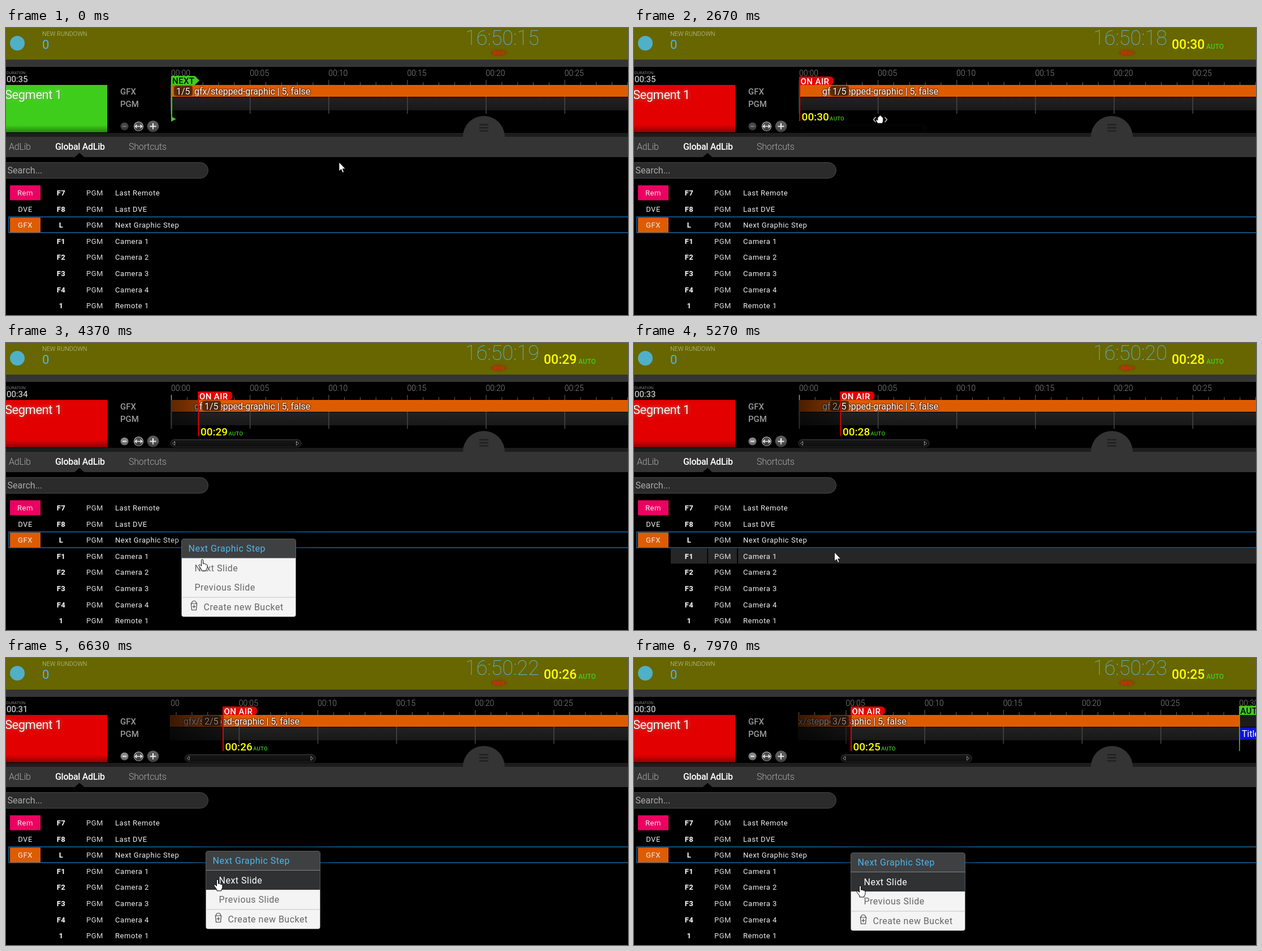
Animation, 1100 px wide and 509 px high, one loop 8000 ms. Source, as an HTML page:

```html
<!DOCTYPE html>
<html lang="en">
<head>
<meta charset="utf-8">
<title>Rundown view</title>
<style>
html, body { margin: 0; width: 100%; height: 100%; overflow: hidden; background: #000; }
svg { display: block; width: 1100px; height: 509px; font-family: Roboto, Arial, sans-serif; }
text { white-space: pre; }
.menu rect.back { filter: drop-shadow(0 0 26px rgba(0, 0, 0, .75)); }
.menu text { font-size: 16px; letter-spacing: .5px; }
.list text { font-size: 13px; letter-spacing: .55px; }
.tab { font-weight: 300; letter-spacing: -.2px; }
.flag { font-weight: 500; font-size: 15px; letter-spacing: .4px; }
.clip text { text-shadow: 0 0 3px #000, 0 0 3px rgba(0, 0, 0, .6); letter-spacing: -.05px; }
#segName { text-shadow: 0 0 6px rgba(255, 255, 255, .5), 1px 1px 3px rgba(0, 0, 0, .35); }
#mode { text-shadow: 0 0 5px rgba(255, 0, 0, .6); }
</style>
</head>
<body>
<svg id="stage" viewBox="0 0 1100 509"></svg>
<script>
const LOOP = 8000, SEC = 27.83, ZERO = 292.5, STICK = 384;
const TICK = 450;          // clock phase
const AIR = 2600, START = 2650;
const ORANGE = '#de5c00', GREEN = '#3fcd1c', RED = '#e20000', BLUE = '#4fb6ea';
const ROW_Y = i => 278 + i * 28.6;

const text = (x, y, size, fill, str, attr = '') =>
  `<text x="${x}" y="${y}" font-size="${size}" fill="${fill}" ${attr}>${str}</text>`;
const rect = (x, y, w, h, fill, attr = '') =>
  `<rect x="${x}" y="${y}" width="${w}" height="${h}" fill="${fill}" ${attr}/>`;
const path = (d, fill, attr = '') => `<path d="${d}" fill="${fill}" ${attr}/>`;
const group = (id, body, attr = '') => `<g id="${id}" ${attr}>${body}</g>`;

const rows = [
  ['Rem', 'F7', 'Last Remote', '#ec0062'], ['DVE', 'F8', 'Last DVE'],
  ['GFX', 'L', 'Next Graphic Step', ORANGE], ['', 'F1', 'Camera 1'],
  ['', 'F2', 'Camera 2'], ['', 'F3', 'Camera 3'], ['', 'F4', 'Camera 4'], ['', '1', 'Remote 1']
];

function header() {
  return rect(0, 0, 1100, 56, '#676600') + rect(0, 56, 1100, 13, '#343434') +
    `<circle cx="20" cy="27" r="13" fill="#4fb0c8"/>` +
    text(64, 13.5, 10.8, '#c3c8a8', 'NEW RUNDOWN', 'font-weight="300"') +
    text(64, 36.5, 22, BLUE, '0') +
    text(812, 29.5, 36, '#5db9dc', '', 'id="clock" font-weight="100"') +
    `<ellipse cx="872" cy="44" rx="15" ry="6" fill="#a01a00" opacity=".25"/>` +
    text(872, 47.5, 9, '#ff1a1a', 'REH', 'id="mode" text-anchor="middle" font-weight="500" letter-spacing="1"') +
    group('headCount', text(951, 36.5, 23, '#ff0', '', 'class="left" font-weight="500"') +
      text(1012, 36.5, 12, GREEN, 'AUTO', 'font-weight="500"'));
}

function segment() {
  return text(1, 81.5, 7, '#bbb', 'DURATION', 'font-weight="300"') +
    text(1, 95.5, 15, '#eee', '', 'id="duration"') +
    rect(0, 101, 179, 84, GREEN, 'id="segBack"') +
    text(-2, 126, 22, '#eef6ea', 'Segment 1', 'id="segName" letter-spacing="-.5"') +
    text(202, 118, 15, '#999', 'GFX', 'font-weight="500"') +
    text(202, 140, 15, '#999', 'PGM', 'font-weight="500"') +
    group('minus', '<circle cx="209.5" cy="174.5" r="7" fill="#888"/>' +
      path('M206 174.5h7', 'none', 'stroke="#fff" stroke-width="2"')) +
    '<circle cx="234.5" cy="174.5" r="8" fill="#4a4a4a" stroke="#ccc" stroke-width="1.2"/>' +
    path('M229 174.5h11M231.5 171.5l-3 3 3 3M237.5 171.5l3 3-3 3', 'none', 'stroke="#fff" stroke-width="1.5"') +
    '<circle cx="260" cy="174.5" r="10.3" fill="#5c5c5c"/>' +
    path('M254.5 174.5h11M260 169v11', 'none', 'stroke="#fff" stroke-width="2"');
}

function timeline() {
  let scale = '', lines = '';
  for (let s = 0; s <= 38; s++) {
    const x = ZERO + s * SEC, major = s % 5 === 0;
    scale += path(`M${x} ${major ? 92 : 96}V101`, 'none', 'stroke="#666"');
    if (!major) continue;
    scale += text(x - .5, 85, 14, '#8a8a8a', '00:' + String(s).padStart(2, '0'), 'font-weight="300"');
    lines += path(`M${x} 122V152`, 'none', 'stroke="#484848" stroke-width="1.5"');
  }
  const end = ZERO + 30 * SEC;
  const moving = scale +
    rect(ZERO, 101, 30 * SEC, 21, ORANGE) + lines +
    path(`M${ZERO} 92V152`, 'none', 'stroke="#999" stroke-width="1.5"') +
    `<g class="clip">${text(333, 118, 16, '#fff', 'gfx/stepped-graphic | 5, false')}</g>` +
    rect(end, 124, 140, 20, '#0b12e0') + text(end + 4, 140, 16, '#fff', 'Title') +
    path(`M${end} 85h42l8 8-8 8H${end}z`, GREEN) + path(`M${end} 85V165`, 'none', `stroke="${GREEN}" stroke-width="1.5"`) +
    text(end + 1.5, 99, 15, '#000', 'AUTO', 'class="flag"');
  return `<g clip-path="url(#lane)">` +
    rect(290, 101, 810, 21, '#1c1c1c') + rect(290, 123, 810, 23, 'url(#track)') +
    group('moving', moving) +
    group('step', rect(0, 102.5, 33, 18, '#5f2b08', 'rx="4"') +
      text(4, 117.5, 16, '#fff', '', 'id="stepText"'), 'class="clip"') +
    group('past', rect(-94, 101, 94, 51, 'url(#fade)')) + '</g>' +
    group('next', path('M292 85h42l8 8-8 8h-42z', GREEN) +
      path('M293 86V163', 'none', `stroke="${GREEN}" stroke-width="2"`) + path('M292 157l9 4.5-9 4.5z', GREEN) +
      text(294, 99, 15, '#000', 'NEXT', 'class="flag"')) +
    group('air', path('M-1 86h54q7 0 7 7.5t-7 7.5h-54z', RED) +
      path('M0 86V165', 'none', `stroke="${RED}" stroke-width="2"`) +
      text(1.5, 99.5, 15, '#fff', 'ON AIR', 'class="flag"') +
      text(3.5, 164, 19, '#ff0', '', 'class="left" font-weight="500"') +
      text(53, 164, 9.5, GREEN, 'AUTO', 'font-weight="500" letter-spacing=".3"')) +
    group('bar', rect(.5, 171.5, 231, 13, '#161616', 'rx="6.5" stroke="#444"') +
      path('M8 174.5v7l-4-3.5zM223 174.5v7l4-3.5z', '#000', 'stroke="#bbb"'));
}

function panel() {
  let list = rect(5, 335, 1110, 28, 'none', 'stroke="#1b7cc0" stroke-width="1.3"');
  rows.forEach(([tag, key, name, color], i) => {
    const y = ROW_Y(i), base = y + 19;
    if (color) list += rect(7, y + 1, 54, 26.5, color);
    list += text(34, base, 13, '#eee', tag, 'text-anchor="middle"') +
      text(97.5, base, 13, '#fff', key, 'text-anchor="middle" font-weight="700"') +
      text(157, base, 13, '#ddd', 'PGM', 'text-anchor="middle"') +
      text(193, base, 13, '#f0f0f0', name);
  });
  return rect(0, 172, 1100, 14, 'url(#shade)') +
    rect(0, 186, 1100, 7, '#1d1d1d') + rect(0, 193, 1100, 36, '#343434') +
    path('M808 193a37 37 0 0 1 74 0z', '#343434') +
    path('M837 171.500h16M837 177h16M837 182.500h16', 'none', 'stroke="#202020" stroke-width="2.4"') +
    path('M121 229.5l9-8 9 8z', '#000') +
    text(5, 215.5, 16, '#aaa', 'AdLib', 'class="tab"') +
    text(87, 215.5, 16, '#fff', 'Global AdLib', 'font-weight="500" letter-spacing="-.3"') +
    text(217, 215.5, 16, '#aaa', 'Shortcuts', 'class="tab"') +
    rect(-20, 238.5, 377.5, 28, '#2b2b2b', 'rx="14" stroke="#474747"') +
    text(2.5, 258, 16, '#aaa', 'Search...') +
    group('hover', rect(65, 0, 64.5, 27, '#262626') + rect(131, 0, 51, 27, '#262626') + rect(184, 0, 916, 27, '#262626')) +
    `<g class="list">${list}</g>`;
}

function menu(id, w, h, title, items, tail = '') {
  const body = items.map((s, i) => text(23, 57 + i * 34.3, 16, '#666', s, 'class="item"')).join('');
  return group(id, rect(0, 0, w, h, '#f4f4f4', 'rx="4" class="back"') +
    path(`M0 34V4q0-4 4-4h${w - 8}q4 0 4 4v30z`, '#3f4042') + text(12, 22, 16, BLUE, title) +
    rect(0, 0, w, 34.3, '#2f3133', 'class="pick"') + body + tail, 'class="menu"');
}

const bucket = path('M0 103.5h202', 'none', 'stroke="#c4c4c4"') +
  path('M16 114.5h12M17 115l1 11h8l1-11M18 114q0-4 4-4t4 4M22 117v6M19 120h6', 'none', 'stroke="#444" stroke-width="1.2"') +
  text(39, 126, 16, '#666', 'Create new Bucket');

const cursors =
  path('M0 0V16L3.7 12.6 6.2 18.4 8.6 17.4 6.2 11.8H11.2Z', '#fff', 'id="arrow" stroke="#000" stroke-width=".8"') +
  path('M-1.5 1.5a1.5 1.5 0 0 1 3 0v6l1-.6 2 .6 1 .6 2 .4 1.5 1.5v5l-2 3v2h-8v-2l-5-7a1.5 1.5 0 0 1 2.5-1.5l2 2z',
    '#fff', 'id="hand" stroke="#000"') +
  group('grab', path('M-4 7l-3-5 1-2 2 2v-6h2v-2h2v-1h2v2h2v2h1.5v6l-1.5 4z', '#fff', 'stroke="#000" stroke-width=".6"') +
    path('M-7.5-4l-4 4.5 4 4.5M8.5-4l4 4.5-4 4.5', 'none', 'stroke="#ddd" stroke-width="1.2"'));

const gradient = (id, dir, a, b) => `<linearGradient id="${id}" ${dir}><stop ${a}/><stop offset="1" ${b}/></linearGradient>`;
document.getElementById('stage').innerHTML = '<defs><clipPath id="lane"><path d="M290.5 69H1100V186H290.5z"/></clipPath>' +
  gradient('fade', 'x2="1"', 'stop-opacity=".75"', 'stop-opacity=".4"') +
  gradient('shade', 'x2="0" y2="1"', 'stop-opacity="0"', 'stop-opacity=".4"') +
  gradient('track', 'x2="0" y2="1"', 'stop-color="#222"', 'stop-color="#181818"') + '</defs>' +
  rect(0, 0, 1100, 509, '#000') + segment() + timeline() + header() + panel() +
  menu('mainMenu', 186, 275, 'New rundown', ['Activate (On-Air)', 'Deactivate', 'Take', 'Hold',
    'Reset Rundown', 'Reload NRCS Data', 'Store Snapshot']) +
  menu('stepMenu', 202, 138, 'Next Graphic Step', ['Next Slide', 'Previous Slide'], bucket) +
  group('cursor', cursors);

const $ = id => document.getElementById(id);
const show = (id, on) => { $(id).style.display = on ? '' : 'none'; };
const move = (id, x, y = 0) => $(id).setAttribute('transform', `translate(${x} ${y})`);
const clamp = v => Math.max(0, Math.min(1, v));

// time, x, y
const route = [
  [30, 589, 238], [570, 405, 39], [1440, 405, 39], [1670, 420, 84], [2250, 435, 152], [2400, 435, 152],
  [2560, 435, 162], [2720, 435, 162], [3250, 310, 347], [4180, 310, 347], [4370, 347, 384],
  [4550, 355, 395], [4950, 355, 398], [5600, 354, 343], [6100, 354, 343], [6450, 372, 390],
  [6820, 376, 396], [7270, 388, 362.5], [7450, 383, 345], [7720, 383, 345], [7970, 400, 404]
];
function pointer(t) {
  const i = route.findIndex(p => p[0] > t);
  if (i === 0) return route[0].slice(1);
  if (i < 0) return route[route.length - 1].slice(1);
  const [t0, x0, y0] = route[i - 1], [t1, x1, y1] = route[i];
  const k = (t - t0) / (t1 - t0), e = k * k * (3 - 2 * k);
  return [x0 + (x1 - x0) * e, y0 + (y1 - y0) * e];
}

const menus = [
  { id: 'mainMenu', open: 880, close: 2500, x: 405, y: 38, n: 7 },
  { id: 'stepMenu', open: 3500, close: 4750, x: 310, y: 347, n: 2 },
  { id: 'stepMenu', open: 5850, close: 6800, x: 353, y: 342, n: 2 },
  { id: 'stepMenu', open: 7530, close: LOOP, x: 383, y: 345, n: 2 }
];

function drawMenu(m, t) {
  show('mainMenu', m && m.id === 'mainMenu');
  show('stepMenu', m && m.id === 'stepMenu');
  if (!m) return;
  const el = $(m.id);
  move(m.id, m.x + .5, m.y + .5);
  el.style.opacity = clamp((t - m.open) / 150);
  const n = Math.floor((pointer(t - 60)[1] - m.y) / 34.3) - 1;
  const picked = n >= 0 && n < m.n;
  const pick = el.querySelector('.pick');
  pick.style.display = picked ? '' : 'none';
  pick.setAttribute('y', 34.3 * (n + 1));
  el.querySelectorAll('.item').forEach((e, i) => e.setAttribute('fill', i === n ? '#fff' : '#666'));
}

function draw(t) {
  const ticks = Math.floor((t + TICK) / 1000);
  const onAir = t >= AIR, played = onAir ? Math.max(0, ticks - 3) : 0;
  const head = ZERO + Math.max(0, t - START) / 1000 * SEC;
  const shift = Math.max(0, head - STICK), x = head - shift;

  $('clock').textContent = '16:50:' + (15 + ticks);
  $('duration').textContent = '00:' + (35 - played);
  document.querySelectorAll('.left').forEach(e => { e.textContent = '00:' + (30 - played); });
  $('segBack').setAttribute('fill', onAir ? RED : GREEN);
  show('headCount', onAir);
  show('next', !onAir);
  show('air', onAir);
  show('past', onAir);
  move('moving', -shift);
  move('air', x);
  move('past', x);
  move('step', onAir ? 347 : 297);
  $('stepText').textContent = (t < 4750 ? 1 : t < 6800 ? 2 : 3) + '/5';
  const live = clamp((t - START) / 300);
  $('minus').style.opacity = .5 + .5 * live;
  $('bar').style.opacity = live;
  move('bar', 290.5 + shift * 1.33);

  const m = menus.find(m => t >= m.open && t < m.close);
  drawMenu(m, t);
  const [cx, cy] = pointer(t);
  const kind = m ? (cy > m.y + 34 ? 'hand' : 'arrow') : cy > 69 && cy < 186 ? 'grab' : 'arrow';
  for (const k of ['arrow', 'hand', 'grab']) show(k, k === kind);
  move('cursor', cx, cy);
  // rows react slightly above their visible top edge
  const row = Math.floor((cy + 2 - ROW_Y(0)) / 28.6);
  show('hover', row >= 0 && row < rows.length && !(m && t > m.open + 300));
  move('hover', 0, ROW_Y(row) + .5);
}

const begin = performance.now();
function frame() {
  draw((performance.now() - begin) % LOOP);
  requestAnimationFrame(frame);
}
frame();
</script>
</body>
</html>
```
